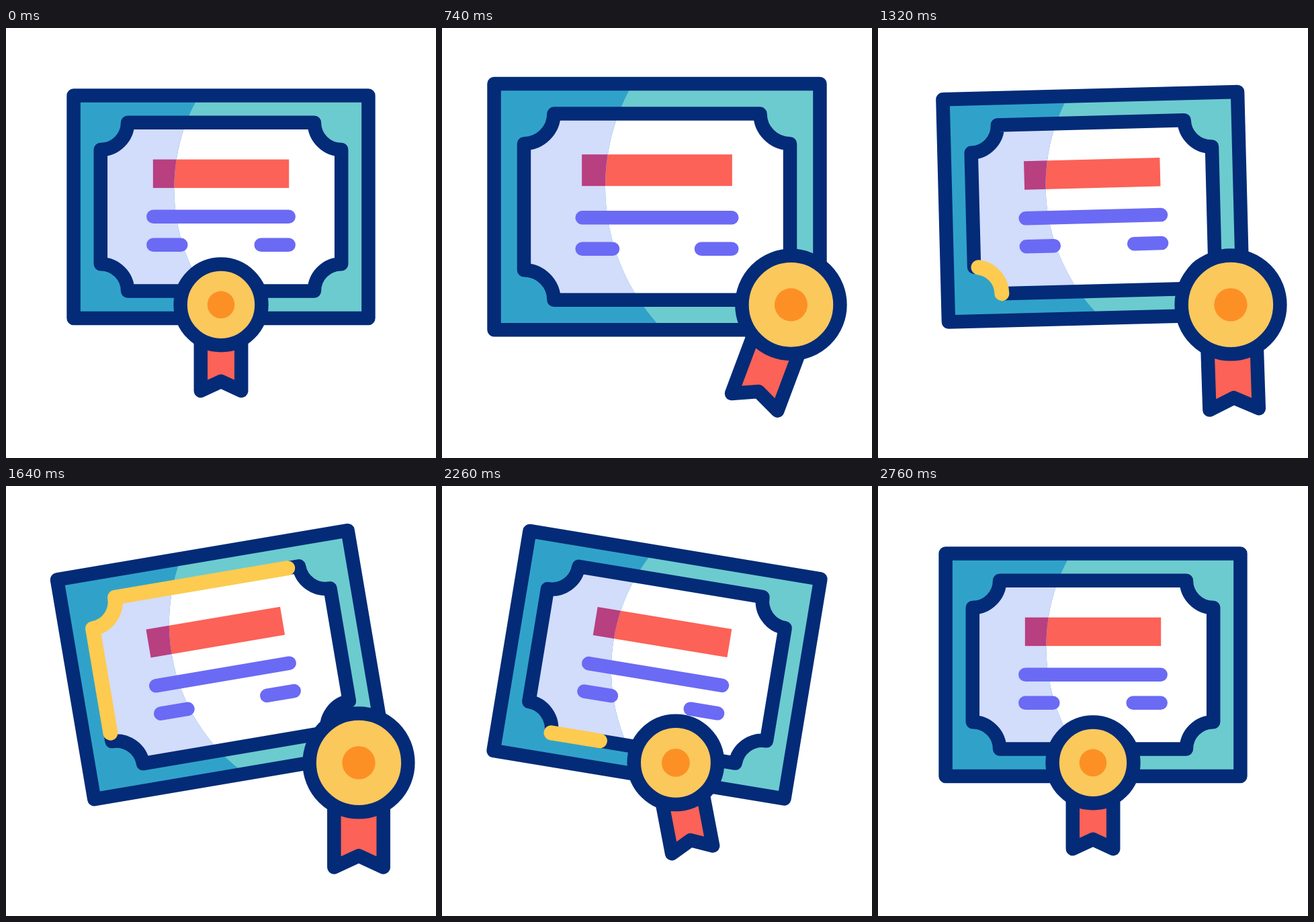
These frames come from a looping animation (640x640 px, 3 s). An HTML page with a canvas:

```html
<!DOCTYPE html>
<html lang="en">
<head>
<meta charset="utf-8">
<title>Certificate</title>
<style>
  html, body { margin: 0; width: 100%; height: 100%; overflow: hidden; background: #fff; }
  canvas { display: block; width: 640px; height: 640px; }
</style>
</head>
<body>
<canvas id="stage"></canvas>
<script>
const LOOP = 3000, LINE = 20.5, TAU = Math.PI * 2;
const NAVY = '#032b77', RED = '#fc6257', PURPLE = '#6b6af4';
const LIGHT = ['#6ccbcf', '#ffffff', RED];
const SHADE = ['#30a2c9', '#d2dcfb', '#b83f80'];

// Tracks: [time in ms, value], eased between neighbours
const tracks = {
  scale: [[200, 1], [700, 1.109], [1060, 1]],
  turn:  [[1200, 0], [1700, -10], [2200, 10], [2600, 0]],
  slide: [[200, 0], [800, 1], [1800, 1], [2400, 0]],
  swing: [[200, 0], [700, 21.5], [1100, -11], [1400, 0], [1800, 0], [2300, -11], [2580, 5], [2760, 0]],
  head:  [[1200, 0], [2100, 1]],
  tail:  [[1500, 0], [2400, 1]]
};

function at(name, t) {
  const keys = tracks[name];
  if (t <= keys[0][0]) return keys[0][1];
  for (let i = 1; i < keys.length; i++) {
    const [t0, a] = keys[i - 1], [t1, b] = keys[i];
    if (t < t1) {
      const u = (t - t0) / (t1 - t0);
      return a + (b - a) * u * u * (3 - 2 * u);
    }
  }
  return keys[keys.length - 1][1];
}

const canvas = document.getElementById('stage');
const ctx = canvas.getContext('2d');
const dpr = window.devicePixelRatio || 1;
canvas.width = canvas.height = 640 * dpr;

const rad = deg => deg * Math.PI / 180;

// Inner frame with notched corners, clockwise from the bottom left
const HW = 179.2, HH = 125.4, NOTCH = 40.3;
const plaque = new Path2D();
[[-1, 1], [-1, -1], [1, -1], [1, 1]].forEach(([x, y], i) => {
  const from = i * Math.PI / 2;
  plaque.arc(x * HW, y * HH, NOTCH, from, from - Math.PI / 2, true);
});
plaque.closePath();
const PERIMETER = 4 * (HW + HH - 2 * NOTCH) + TAU * NOTCH;

const border = new Path2D();
border.rect(-219.4, -165.7, 438.8, 331.4);

const shadow = new Path2D();
shadow.rect(-400, -400, 1000, 800);
shadow.arc(208.3, -27.2, 278, 0, TAU);

function faces([back, paper, bar]) {
  ctx.fillStyle = back;
  ctx.fill(border);
  ctx.fillStyle = paper;
  ctx.fill(plaque);
  ctx.fillStyle = bar;
  ctx.fillRect(-101.2, -70.6, 202.4, 42.5);
}

function rule(x0, x1, y) {
  ctx.beginPath();
  ctx.moveTo(x0, y);
  ctx.lineTo(x1, y);
  ctx.stroke();
}

function certificate(t) {
  const s = at('scale', t);
  ctx.save();
  ctx.translate(320, 266.2);
  ctx.rotate(rad(at('turn', t)));
  ctx.scale(s, s);

  faces(LIGHT);
  ctx.save();
  ctx.clip(shadow, 'evenodd');
  faces(SHADE);
  ctx.restore();

  ctx.lineWidth = LINE / s;
  ctx.strokeStyle = PURPLE;
  rule(-100.7, 100.7, 14.5);
  rule(-100.7, -59.7, 56.5);
  rule(59.7, 100.7, 56.5);

  ctx.strokeStyle = NAVY;
  ctx.stroke(border);
  ctx.stroke(plaque);

  const head = at('head', t), tail = at('tail', t);
  if (head > tail) {
    ctx.strokeStyle = '#fdcb50';
    ctx.lineWidth = 22;
    ctx.setLineDash([(head - tail) * PERIMETER, 2 * PERIMETER]);
    ctx.lineDashOffset = -tail * PERIMETER;
    ctx.stroke(plaque);
  }
  ctx.restore();
}

function disc(r, fill) {
  ctx.beginPath();
  ctx.arc(0, 0, r, 0, TAU);
  ctx.fillStyle = fill;
  ctx.fill();
}

function badge(t) {
  const p = at('slide', t), s = 1 + 0.215 * p;
  ctx.save();
  ctx.translate(320 + 205 * p, 411.9);
  ctx.scale(s, s);
  ctx.lineWidth = LINE / s;
  ctx.strokeStyle = NAVY;

  ctx.save();
  ctx.rotate(rad(at('swing', t)));
  ctx.beginPath();
  [[-30.2, 40], [-30.2, 128], [0, 114], [30.2, 128], [30.2, 40]].forEach(q => ctx.lineTo(...q));
  ctx.closePath();
  ctx.fillStyle = RED;
  ctx.fill();
  ctx.stroke();
  ctx.restore();

  disc(60.4, '#fbc85c');
  ctx.stroke();
  disc(20.3, '#fc9025');
  ctx.restore();
}

function draw(t) {
  ctx.setTransform(dpr, 0, 0, dpr, 0, 0);
  ctx.fillStyle = '#fff';
  ctx.fillRect(0, 0, 640, 640);
  ctx.lineCap = ctx.lineJoin = 'round';
  certificate(t);
  badge(t);
}

const start = performance.now();
function tick() {
  draw((performance.now() - start) % LOOP);
  requestAnimationFrame(tick);
}
tick();
</script>
</body>
</html>
```
